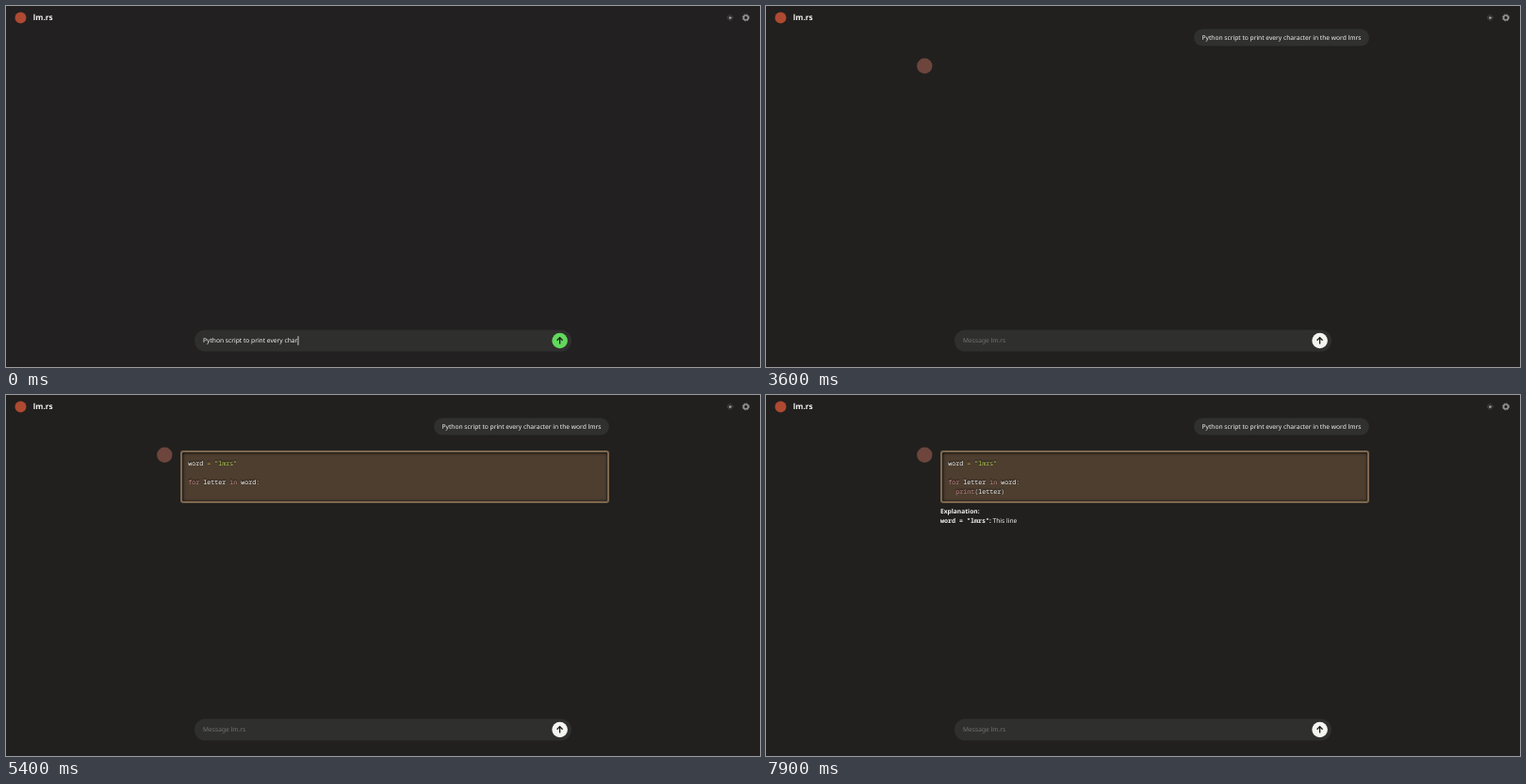
Recreate the animation shown at these times as an HTML page. Size 800 px wide and 384 px high, loop 8 s.

```html
<!DOCTYPE html>
<html lang="en">
<head>
<meta charset="utf-8">
<title>Chat</title>
<style>
html, body { margin: 0; width: 100%; height: 100%; overflow: hidden; background: #21201e; }
#block {
  position: absolute; left: 185px; top: 58.7px; width: 455px; box-sizing: border-box;
  background: #4d3e30; border: 2px solid #7d6850; border-radius: 3.3px;
  box-shadow: .4px .4px 3.3px #000 inset;
}
svg { position: absolute; left: 0; top: 0; }
text { font: 6.67px "Noto Sans", sans-serif; fill: #f2f2f0; text-rendering: geometricPrecision; }
.title { font-size: 8.33px; font-weight: 700; }
.mono { font-family: "Noto Sans Mono", monospace; }
#code { fill: #fff; text-shadow: 0 -.6px 1.3px #000; }
.bold { font-weight: 700; }
.key { fill: #cd928f; }
.str { fill: #bad458; }
.op { fill: #d3b650; }
.punct { fill-opacity: .75; }
</style>
</head>
<body>
<div id="block"></div>
<svg width="800" height="384" viewBox="0 0 800 384">
  <circle cx="15.5" cy="12.5" r="6" fill="#ae4932"/>
  <text class="title" x="28.7" y="15.2">lm.rs</text>
  <g stroke="#929290" fill="#929290">
    <circle cx="768.3" cy="12.4" r="1.5" stroke="none"/>
    <circle cx="768.3" cy="12.4" r="2.7" fill="none" stroke-width="1" stroke-dasharray=".6 1.52"/>
    <circle cx="785" cy="12.4" r="2.4" fill="none" stroke-width="1.6"/>
    <circle cx="785" cy="12.4" r="3.5" fill="none" stroke-width=".9" stroke-dasharray="1.5 1.25"/>
  </g>
  <g id="chat">
    <rect x="454" y="24.6" width="186" height="18" rx="9" fill="#30302f"/>
    <text id="sent" x="462.5" y="36.2"></text>
    <circle cx="168.3" cy="63.8" r="8.2" fill="#6d453d"/>
  </g>
  <text id="code" class="mono" xml:space="preserve"></text>
  <text id="prose" xml:space="preserve"></text>
  <rect x="200" y="344.5" width="400" height="23" rx="11.5" fill="#2f2f2e"/>
  <text id="input" x="209" y="358.4" xml:space="preserve"></text>
  <rect id="caret" y="351.2" width=".8" height="9.6" fill="#f2f2f0"/>
  <circle id="button" cx="587.6" cy="356" r="8.3"/>
  <path d="M587.6 359.6V352.8M584.6 355.7L587.6 352.6L590.6 355.7" fill="none" stroke="#1c1c1b" stroke-width="1.3"/>
</svg>
<script>
const $ = id => document.getElementById(id);
const LOOP = 8000, SEND = 1100, REPLY = 4000, TICK = 100;
const CARET_START = SEND - 3, CARET_HALF = 219;
const PROMPT = 'Python script to print every character in the word lmrs';
const GREEN = [98, 217, 92], WHITE = [244, 244, 240];

const CODE = ['word', ' =', ' "', 'lm', 'rs', '"', '', '\n\nfor letter', ' in', ' word',
  ':', '\n', '', '  ', 'print', '(', 'letter', ')'];
const PROSE = ['**', 'Explanation', ':**', '', '\n**', '`', 'word', ' =', ' "', 'lm', 'rs',
  '"`', ':**', ' This', ' line'];

const span = (cls, s) => `<tspan class="${cls}">${s}</tspan>`;
const streamed = (tokens, start, t) =>
  tokens.slice(0, Math.max(0, Math.floor((t - start) / TICK + 1.1))).join('');

const highlight = s => s.replace(/"\w+"|\b(?:for|in|print)\b|[=():]/g, m =>
  span(m[0] === '"' ? 'str' : m === '=' ? 'op' : /\w/.test(m) ? 'key' : 'punct', m));

const markdown = s => s
  .replace(/`([^`]+)`/g, (_, c) => span('mono', c))
  .replace(/\*\*(.+?)\*\*/g, (_, b) => span('bold', b));

function show(id, html) {
  const el = $(id);
  if (el.shown !== html) el.innerHTML = el.shown = html;
}

const setLines = (id, text, x, y, format) => show(id, text.split('\n')
  .map((line, i) => `<tspan x="${x}" y="${y + i * 10}">${format(line)}</tspan>`).join(''));

function draw(t) {
  const typing = t < SEND, replying = t >= REPLY;
  document.body.style.background = typing ? '#222021' : '#21201e';

  show('input', typing ? PROMPT.slice(0, 33 + Math.floor(t * .022)) : 'Message lm.rs');
  $('input').style.fill = typing ? '' : '#737371';
  $('caret').setAttribute('x', typing ? 209.3 + $('input').getComputedTextLength() : 208.8);
  const lit = typing || Math.floor((t - CARET_START) / CARET_HALF) % 2 === 0;
  $('caret').style.display = lit ? '' : 'none';

  const fade = Math.min(1, Math.max(0, (t - SEND + 40) / 220));
  $('button').style.fill = `rgb(${GREEN.map((c, i) => c + (WHITE[i] - c) * fade)})`;

  $('chat').style.display = typing ? 'none' : '';
  $('block').style.display = replying ? '' : 'none';
  const code = replying ? streamed(CODE, 4200, t) || 'undefined' : '';
  setLines('code', code, 193.3, 74.6, highlight);
  $('block').style.height = 16.6 + 10 * code.split('\n').length + 'px';
  setLines('prose', streamed(PROSE, 6500, t), 185, 126.2, markdown);
}

$('sent').textContent = PROMPT;
const begin = performance.now();
function frame() {
  draw((performance.now() - begin) % LOOP);
  requestAnimationFrame(frame);
}
frame();
</script>
</body>
</html>
```
